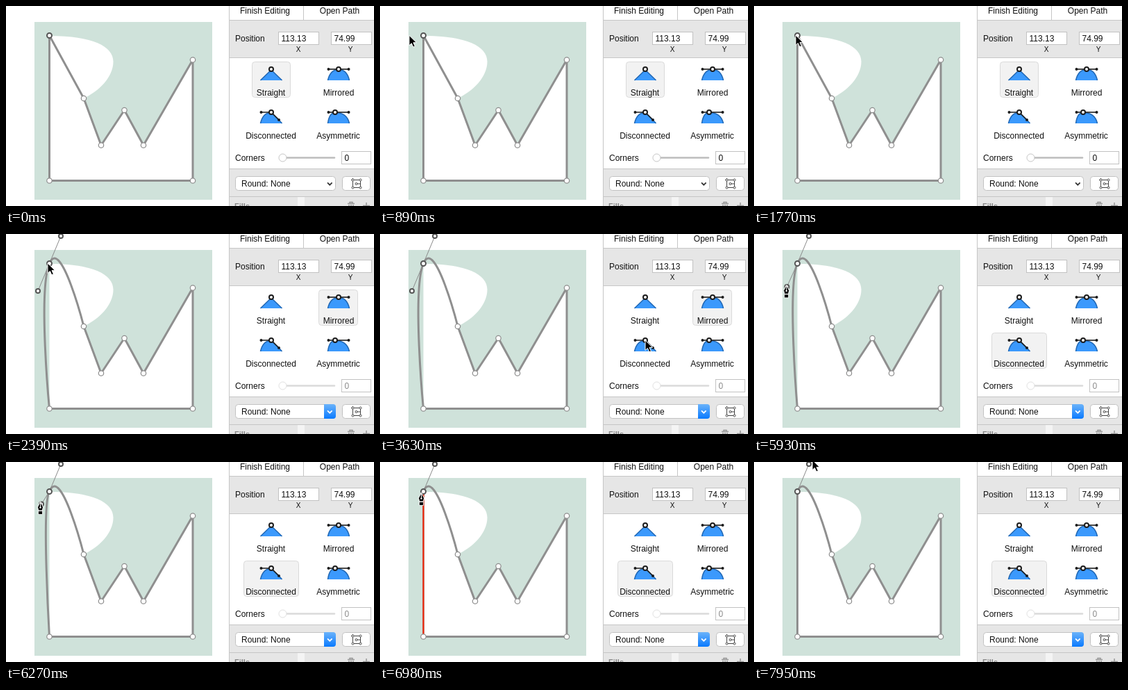
Recreate the animation shown at these times as an HTML page. Size 530 px wide and 288 px high, loop 8 s.

```html
<!DOCTYPE html>
<html lang="en">
<head>
<meta charset="utf-8">
<title>Vector point editing</title>
<style>
  html, body { margin: 0; width: 100%; height: 100%; overflow: hidden; background: #fff; }
  svg { display: block; width: 530px; height: 288px; }
  text { font: 12px "Liberation Sans", Arial, sans-serif; fill: #111; }
  .mid { text-anchor: middle; }
  .small { font-size: 10px; }
  .field { fill: #fff; stroke: #c2c2c2; }
  .outline { fill: none; stroke: #8f8f8f; stroke-width: 3; stroke-linejoin: round; }
  .hover { fill: none; stroke: #ff2a0c; stroke-width: 2; }
  .node { fill: #fff; stroke: #8c8c8c; stroke-width: 1.2; }
  .active { fill: #fff; stroke: #555; stroke-width: 2; }
  .lever { stroke: #8a8a8a; stroke-width: 1; }
  .dome { fill: #3b99fc; }
  .edge { fill: none; stroke: #2268b4; stroke-width: 1.6; }
  .bar { fill: none; stroke: #1c1c1c; stroke-width: 1.6; }
  .knot { fill: #fff; stroke: #1c1c1c; stroke-width: 2; }
</style>
</head>
<body>
<svg viewBox="0 0 530 288" xmlns="http://www.w3.org/2000/svg">
  <rect width="530" height="288" fill="#fff"/>

  <rect x="41" y="23" width="256" height="256" fill="#cfe2da"/>
  <path fill="#fff" d="M62.5 43C125 43 154.500 58 154.500 80C154.500 103 133 123 112 133L137 200.500L170.500 150L198 200.500L269 77.500V251.500H62.500Z"/>
  <path class="outline" d="M112 133L137 200.500L170.500 150L198 200.500L269 77.500V251.500H62.500"/>
  <path class="outline" id="left"/>
  <path class="outline" id="right"/>
  <path class="hover" id="hover"/>
  <g id="nodes"></g>
  <line class="lever" id="upperLine" x1="62.500" y1="42.500" x2="79" y2="3"/>
  <line class="lever" id="lowerLine" x1="62.500" y1="42.500"/>
  <circle class="active" id="upperKnob" cx="79" cy="3" r="3"/>
  <circle class="active" id="lowerKnob" r="3"/>
  <circle class="active" cx="62.500" cy="42.500" r="3.500"/>

  <rect x="321" width="209" height="288" fill="#fff"/>
  <rect x="321" y="20" width="209" height="55" fill="#e6e6e6"/>
  <rect x="321" y="234" width="209" height="54" fill="#e6e6e6"/>
  <path fill="none" stroke="#c6c6c6" d="M321.500 0V288M428.500 0V20M321 20.500H530M321 74.500H530M321 234.500H530M321 274.500H530"/>
  <text class="mid" x="373" y="11">Finish Editing</text>
  <text class="mid" x="480.500" y="11">Open Path</text>
  <text x="330" y="51">Position</text>
  <rect class="field" x="392.500" y="37.500" width="58" height="18"/>
  <rect class="field" x="468.500" y="37.500" width="58" height="18"/>
  <text x="396.500" y="51">113.13</text>
  <text x="472.500" y="51">74.99</text>
  <text class="mid small" x="421" y="66">X</text>
  <text class="mid small" x="496" y="66">Y</text>

  <rect id="choice" rx="4" fill="#f2f2f2" stroke="#dadada"/>
  <g id="icons"></g>
  <text class="mid" x="381.500" y="128.500">Straight</text>
  <text class="mid" x="479" y="128.500">Mirrored</text>
  <text class="mid" x="381.500" y="190.500">Disconnected</text>
  <text class="mid" x="478.500" y="190.500">Asymmetric</text>

  <text x="330" y="223" textLength="">Corners</text>
  <g id="slider">
    <path stroke="#bdbdbd" stroke-width="2.500" stroke-linecap="round" d="M404 218.500H473"/>
    <circle cx="398.500" cy="218.500" r="5.500" fill="#fff" stroke="#c4c4c4"/>
  </g>
  <rect class="field" x="483.500" y="209.500" width="42" height="18"/>
  <text id="radius" x="487.500" y="223">0</text>

  <rect class="field" x="330.500" y="245.500" width="144" height="20" rx="4"/>
  <text x="339" y="259.500">Round: None</text>
  <linearGradient id="blue" x2="0" y2="1">
    <stop stop-color="#6bb3fa"/><stop offset="1" stop-color="#0a7aff"/>
  </linearGradient>
  <path id="cap" fill="url(#blue)" d="M458 245H471Q475 245 475 249V262Q475 266 471 266H458Z"/>
  <path id="chevron" fill="none" stroke-width="1.700" d="M463 254.300L466.300 257.700L469.600 254.300"/>
  <rect class="field" x="484.500" y="245.500" width="40" height="20" rx="4"/>
  <g fill="#fff" stroke="#444">
    <path fill="none" d="M497 250.500H510.500V261.500H499.500V248M504 256H511"/>
    <circle cx="499.500" cy="250.500" r="1.500"/><circle cx="510.500" cy="250.500" r="1.500"/>
    <circle cx="499.500" cy="261.500" r="1.500"/><circle cx="510.500" cy="261.500" r="1.500"/>
    <circle cx="504.500" cy="256" r="1.500"/>
  </g>
  <text x="329" y="292" style="font-size:11px;font-weight:bold;fill:#888">Fills</text>
  <rect x="420" y="275" width="10" height="13" fill="#f4f4f4"/>
  <path fill="none" stroke="#999" stroke-width="1.500" d="M492 284.500H502M495 284V282.500H499V284M494 286V288M497 286V288M500 286V288M519 283V288M514 287.500H524"/>

  <path id="arrow" fill="#000" stroke="#fff" d="M0 0V14.500L3.400 11.400L5.800 16.800L8.400 15.700L6 10.400H10.500Z"/>
  <g id="pen">
    <path stroke="#fff" d="M0 -.5L4 7.500L2.800 12.500H-2.800L-4 7.500Z"/>
    <rect x="-3" y="13" width="6" height="5" stroke="#fff" stroke-width=".8"/>
    <path fill="none" stroke="#fff" d="M0 1V7"/>
    <circle cy="8" r="1.200" fill="#fff"/>
  </g>
</svg>
<script>
const LOOP = 8000, TICK = 88.35;
const el = id => document.getElementById(id);
const set = (id, attrs) => {
  for (const name in attrs) el(id).setAttribute(name, attrs[name]);
};
const show = (id, on) => set(id, { visibility: on ? "visible" : "hidden" });

const corners = [[112, 133], [137, 200.5], [170.5, 150], [198, 200.5],
  [269, 77.5], [269, 251.5], [62.5, 251.5]];
el("nodes").innerHTML = corners
  .map(([x, y]) => `<circle class="node" cx="${x}" cy="${y}" r="3.700"/>`).join("");

// Icons share a node on the top line; ends are the handle dots.
function icon(x, y, curve, knot, ends) {
  const dots = ends.map(([dx, dy]) => `<circle cx="${dx}" cy="${dy}" r="2" fill="#1c1c1c"/>`).join("");
  const bar = ends.length ? `<path class="bar" d="M${ends[0]}L${knot},0L${ends[1]}"/>` : "";
  return `<g transform="translate(${x} ${y})"><path class="dome" d="${curve}Z"/>
    <path class="edge" d="${curve}"/>${bar}${dots}<circle class="knot" cx="${knot}" r="3"/></g>`;
}
const dome = "M-15.500 16C-13 5 -8 .5 0 .5S13 5 15.500 16";
el("icons").innerHTML =
  icon(382, 91, "M-15.500 16L0 1L15.500 16", 0, []) +
  icon(479, 91, dome, 0, [[-14.5, 0], [14.5, 0]]) +
  icon(382, 153, "M-15.500 16C-13 5 -8 .5 0 .5L11 11L15.500 16", 0, [[-14.5, 0], [11, 11]]) +
  icon(479, 153, "M-15.500 16C-14 5 -10 .5 -5 .5C6 .5 13 5 15.500 16", -5, [[-14.5, 0], [14.5, 0]]);

// Each key is [tick, x, y].
const pointer = [
  [6, 7, 43], [9, 36, 43], [12, 54, 41], [13, 54, 41], [14, 57, 40], [15, 57, 40],
  [16, 61, 41], [20, 60, 42], [33, 60, 42], [34, 130, 70], [35, 316, 118], [36, 316, 118],
  [37, 348, 143], [41, 382, 153], [48, 382, 153], [49, 368, 152], [50, 245, 142],
  [51, 102, 130], [53, 102, 130], [54, 78, 113], [56, 65, 101], [59, 47, 82],
  [60, 46, 80], [61, 46, 78], [66, 46, 78], [71, 49.5, 57.5], [76, 56.5, 46],
  [79, 59.5, 44.5], [86, 59.5, 44.5], [87, 67, 36], [88, 75, 17], [90, 84, -3]
];
const lowerHandle = [[25, 46, 82], [60, 46, 82], [61, 46.5, 80], [66, 46.5, 80],
  [71, 51, 60.5], [76, 59, 48]];

function along(keys, tick) {
  if (tick <= keys[0][0]) return keys[0].slice(1);
  const i = keys.findIndex(key => key[0] >= tick);
  if (i < 0) return keys[keys.length - 1].slice(1);
  const [t0, x0, y0] = keys[i - 1], [t1, x1, y1] = keys[i];
  const k = (tick - t0) / (t1 - t0);
  return [x0 + (x1 - x0) * k, y0 + (y1 - y0) * k];
}

function render(time) {
  const tick = Math.floor((time + 4) / TICK);
  const curved = tick >= 25, lower = curved && tick < 77;

  const [hx, hy] = along(lowerHandle, tick);
  const left = "M62.5 42.5" + (lower ? `C${hx} ${hy} 62.5 251.5 62.5 251.5` : "V251.5");
  const right = "M62.5 42.5" + (curved ? "C79 3 112 133 112 133" : "L112 133");
  set("left", { d: left });
  set("right", { d: right });
  const leftHover = tick >= 79 && tick < 84, rightHover = tick === 87 || tick === 88;
  set("hover", { d: leftHover ? left : right });
  show("hover", leftHover || rightHover);
  set("lowerLine", { x2: hx, y2: hy });
  set("lowerKnob", { cx: hx, cy: hy });
  show("upperLine", curved);
  show("upperKnob", curved);
  show("lowerLine", lower);
  show("lowerKnob", lower);

  const [x, y, width] = tick < 27 ? [354.5, 80.5, 55] : tick < 43 ? [450.5, 80.5, 56] : [342.5, 142.5, 79];
  set("choice", { x, y, width, height: 51 });
  set("slider", { opacity: tick < 27 ? 1 : 0.55 });
  el("radius").style.fill = tick < 27 ? "#111" : "#8d8d8d";
  show("cap", tick >= 23);
  set("chevron", { stroke: tick >= 23 ? "#fff" : "#333" });

  const pen = tick >= 60 && tick < 89;
  const [px, py] = along(pointer, tick);
  for (const id of ["arrow", "pen"]) set(id, { transform: `translate(${px} ${py})` });
  show("arrow", tick >= 6 && !pen);
  show("pen", pen);
}

const start = performance.now();
function frame() {
  render((performance.now() - start) % LOOP);
  requestAnimationFrame(frame);
}
frame();
</script>
</body>
</html>
```
